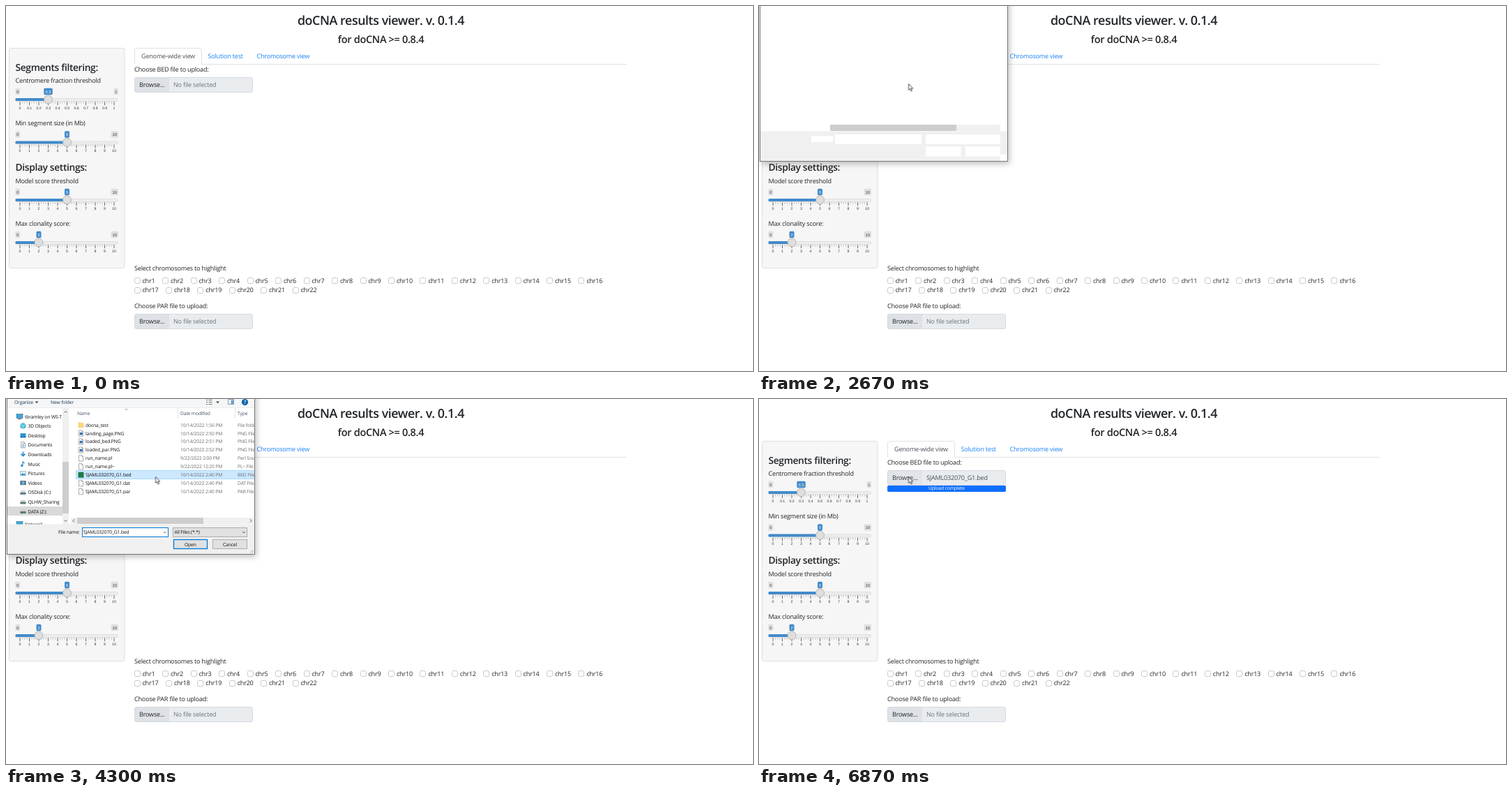
These frames come from a looping animation (1071 px wide and 523 px high, 8 s). An HTML page:

```html
<!DOCTYPE html>
<html lang="en">
<head>
<meta charset="utf-8">
<title>Results viewer</title>
<style>
html, body { margin: 0; width: 100%; height: 100%; overflow: hidden; background: #fff; }
#stage { position: absolute; left: 0; top: 0; width: 1071px; height: 523px; overflow: hidden; }
svg { position: absolute; left: 0; top: 0; }
text, .bar { font-family: "Open Sans", "Noto Sans", sans-serif; letter-spacing: -.022em; text-rendering: geometricPrecision; }
.h { font-weight: 600; letter-spacing: -.025em; }
.num { font-family: "Liberation Sans", Arial, sans-serif; letter-spacing: 0; }

/* Parts that switch on and off within the 8 s loop */
.timed { opacity: 0; animation: 8s step-end infinite; }
.hovered { animation-name: hovered; }
.before { animation-name: before; }
.after { animation-name: after; }
.ring { animation-name: ring; }
.listed { animation-name: listed; }
.early { animation-name: early; }
.blank { animation-name: blank; }
.ready { animation-name: ready; }
.rowHover { animation-name: rowHover; }
.picked { animation-name: picked; }
.caret { animation-name: caret; }
@keyframes hovered { 10% { opacity: 1 } 100% { opacity: 1 } }
@keyframes before { 0% { opacity: 1 } 62.875% { opacity: 0 } }
@keyframes after { 62.875%, 100% { opacity: 1 } }
@keyframes ring { 11.5% { opacity: 1 } 12.375% { opacity: 0 } 26.5% { opacity: 1 } 28.25% { opacity: 0 } }
@keyframes listed { 36.125%, 100% { opacity: 1 } }
@keyframes early { 36.125% { opacity: 1 } 37.875% { opacity: 0 } }
@keyframes blank { 0% { opacity: 1 } 37.875% { opacity: 0 } }
@keyframes ready { 37.875%, 100% { opacity: 1 } }
@keyframes rowHover { 36.125% { opacity: 1 } 49.375% { opacity: 0 } }
@keyframes picked { 49.375%, 100% { opacity: 1 } }
@keyframes caret { 37.875% { opacity: 1 } 44.375% { opacity: 0 } }

.dialog { opacity: 0; transform-origin: 178px 60px; animation: dialog 8s linear infinite; }
@keyframes dialog {
  0%, 28.24% { opacity: 0; transform: scale(.94) }
  28.25% { opacity: .3; transform: scale(.95); animation-timing-function: ease-out }
  31%, 55.49% { opacity: 1; transform: none }
  55.5%, 100% { opacity: 0; transform: none }
}
.frame { filter: drop-shadow(2px 3px 4px rgba(0, 0, 0, .26)); }

.cursor { animation: cursor 8s linear infinite; }
@keyframes cursor {
  0%, .86% { opacity: 0; transform: translate(874px, 430px) }
  .875% { opacity: 1; transform: translate(874px, 430px); animation-timing-function: cubic-bezier(.3, 0, .4, 1) }
  10.625%, 100% { opacity: 1; transform: translate(214.5px, 111.5px) }
}

.track { position: absolute; left: 184px; top: 124px; width: 170px; height: 8.5px; border-radius: 2px; overflow: hidden; background: #e9ecef; }
.fill { position: absolute; left: 0; top: 0; height: 100%; background: #0d6efd; overflow: hidden; animation: fill 8s linear infinite; }
.bar { width: 100%; position: absolute; left: 0; top: 0; overflow: hidden; white-space: nowrap; text-align: center; color: #fff; font-size: 6.8px; line-height: 8.5px; }
.sending { animation-name: sending; }
.done { animation-name: done; }
@keyframes fill {
  0%, 66.125% { width: 0 }
  74.875% { width: 61px }
  76.5% { width: 86px; animation-timing-function: ease }
  85.875%, 100% { width: 170px }
}
@keyframes sending { 0% { opacity: 1 } 77.375% { opacity: 0 } }
@keyframes done { 77.375%, 100% { opacity: 1 } }
</style>
</head>
<body>
<div id="stage"></div>
<script>
const FILE = 'SJAML032070_G1.bed';
const range = n => [...Array(n).keys()];
const list = (n, draw) => range(n).map(draw).join('');
const text = (x, y, s, size = 9.05, fill = '#212529', extra = '') =>
  `<text x="${x}" y="${y}" font-size="${size}" fill="${fill}" ${extra}>${s}</text>`;
const rect = (x, y, w, h, fill, extra = '') =>
  `<rect x="${x}" y="${y}" width="${w}" height="${h}" fill="${fill}" ${extra}/>`;
const path = (d, stroke, width = 1, fill = 'none') =>
  `<path d="${d}" stroke="${stroke}" stroke-width="${width}" fill="${fill}"/>`;
const timed = (name, body) => `<g class="timed ${name}">${body}</g>`;
const small = (x, y, s, fill = '#111', extra = '') => text(x, y, s, 6.75, fill, extra);
const middle = 'text-anchor="middle"';
const chevron = (x, y, r, dir = 1, color = '#444') =>
  path(`M${x - r} ${y - r * dir / 2}l${r} ${r * dir}l${r} ${-r * dir}`, color, .9);

function slider(label, cy, max, value) {
  const at = v => 20 + 135 * v / max;
  const badge = (x, w, s, bg, fg) => rect(x - w / 2, cy - 16.2, w, 9.4, bg, 'rx="1.6"') +
    text(x, cy - 9.4, s, 5.7, fg, `class="num" ${middle}`);
  const ticks = list(41, i => {
    const x = 20 + i * 3.375, big = i % 4 === 0;
    return path(`M${x} ${cy + 3.2}v${big ? 5 : 2.4}`, big ? '#444' : '#999', big ? .8 : .6);
  });
  const labels = list(11, i =>
    text(20 + i * 13.5, cy + 13.8, +(i * max / 10).toFixed(1), 5.2, '#333', `class="num" ${middle}`));
  const x = at(value), maxW = max > 9 ? 10.5 : 6.5;
  return text(13.5, cy - 24.2, label) + ticks + labels +
    rect(13.5, cy - 1.5, 147, 4, '#ededed', 'rx="2" stroke="#d2d2d2" stroke-width=".6"') +
    rect(13.5, cy - 2, x - 13.5, 4, '#428bca', 'rx="1.5"') +
    badge(16.8, 7, 0, '#dee0e3', '#333') + badge(161 - maxW / 2, maxW, max, '#dee0e3', '#333') +
    badge(x, value < 1 ? 12.5 : 7, value, '#428bca', '#fff') +
    `<circle cx="${x}" cy="${cy - .2}" r="6" fill="#dedede" stroke="#ababab" stroke-width=".8"/>`;
}

function upload(y, label, live) {
  const browse = fill => text(191, y + 13.8, 'Browse...', 9.05, fill);
  const button = fill => path(`M234 ${y}H187q-2.5 0-2.5 2.5v16q0 2.5 2.5 2.5H234z`, 'none', 0, fill);
  const empty = text(240, y + 13.8, 'No file selected', 9.05, '#6c757d');
  return text(184, y - 8.4, label) +
    rect(184.5, y, 169, 21, '#e9ecef', 'rx="2.5"') + button('#dee2e6') + browse('#212529') +
    (live ? timed('hovered', button('#e1e4e9') + browse('#3b3642')) +
      timed('before', empty) + timed('after', text(240, y + 13.8, FILE, 9.05, '#495057')) : empty) +
    rect(184.5, y, 169, 21, 'none', 'rx="2.5" stroke="#ced4da" stroke-width=".8"');
}

function checkbox(i) {
  const row = i < 16 ? 0 : 1;
  const x = row ? 184 + (i - 16) * 45.4 : 184 + i * 40.5 + Math.max(0, i - 9) * 4.9;
  const y = 389.5 + row * 13.7;
  return rect(Math.floor(x) + .5, Math.floor(y) + .5, 8, 8, '#fff', 'rx="2" stroke="#bcbcbc" stroke-width=".8"') +
    text(x + 11.5, y + 7, 'chr' + (i + 1));
}

const page = () =>
  text(537.5, 26.5, 'doCNA results viewer. v. 0.1.4', 17.9, '#212529', `class="h" ${middle}`) +
  text(537.5, 52.7, 'for doCNA &gt;= 0.8.4', 14.6, '#212529', `class="h" ${middle}`) +
  rect(4.5, 60.5, 165.5, 315, '#f6f6f6', 'rx="2.5" stroke="#dfdfdf"') +
  text(13.5, 92.5, 'Segments filtering:', 13.8, '#212529', 'class="h"') +
  slider('Centromere fraction threshold', 134, 1, .3) +
  slider('Min segment size (in Mb)', 195.5, 10, 5) +
  text(13.5, 236, 'Display settings:', 13.8, '#212529', 'class="h"') +
  slider('Model score threshold', 278, 10, 5) +
  slider('Max clonality score:', 339, 10, 2) +
  path('M184.5 83.5V63.5q0-3 3-3H277.5q3 0 3 3V83.5H890', '#dee2e6') +
  text(194, 75.4, 'Genome-wide view', 9.05, '#495057') +
  text(289.5, 75.4, 'Solution test', 9.05, '#1a82f7') +
  text(359.5, 75.4, 'Chromosome view', 9.05, '#1a82f7') +
  upload(102.5, 'Choose BED file to upload:', true) +
  text(184, 379, 'Select chromosomes to highlight') + list(22, checkbox) +
  upload(441.5, 'Choose PAR file to upload:', false);

// Icons are drawn around their own centre
const BLUE = '#2b8fd0';
const sheet = path('M-3-4.2H1.2L3-2.4V4.2H-3zM1.2-4.2V-2.4H3', '#8a8a8a', .7, '#fff');
const drive = color => rect(-4, 0, 8, 3, '#666') + rect(-3.2, -2.5, 6.4, 2, '#c8ccd0') + rect(-2, .8, 5, 1.2, color);
const icons = {
  sheet,
  image: sheet + rect(-1.8, -1.2, 4, 3.6, '#2a6fb5'),
  folder: path('M-3.5-3.5H-.5L.3-2.5H3.5V3.5H-3.5z', '#e8bd55', .5, '#ffd675'),
  green: rect(-4, -4, 8, 8, '#1d7a45'),
  pc: rect(-4.5, -3.5, 9, 6, '#3da5dd', 'stroke="#4c6c80" stroke-width=".6"') + path('M-2.5 3.7H2.5', '#555'),
  cube: path('M0-4L3.6-2V2L0 4L-3.6 2V-2z', '#1c86a8', .6, '#49c3df') + path('M-3.6-2L0 0L3.6-2M0 0V4', '#fff', .5),
  desktop: rect(-4, -3, 8, 6, BLUE) + path('M-4 2.4H4', '#14679e', 1.2),
  docs: sheet + path('M-1.6-1H1.6M-1.6.8H1.6M-1.6 2.6H1.6', BLUE, .8),
  down: path('M0-4V2M-3-.8L0 2.2L3-.8', BLUE, 1.7),
  music: path('M-.6 2.6V-3.6Q.2-1.8 2.2-1', BLUE, 1.2) + `<circle cx="-1.8" cy="2.5" r="1.7" fill="${BLUE}"/>`,
  pictures: rect(-4, -3, 8, 6, '#dff1fb', 'stroke="#7a98a8" stroke-width=".6"') + path('M-3.5 2.6L-1-.6L.8 1.2L2-.2L3.6 2.6z', 'none', 0, BLUE),
  videos: rect(-4, -3, 8, 6, '#4a5560') + rect(-2.3, -2.4, 4.6, 4.8, '#5db4e4'),
  disk: drive('#3c9fe0'),
  net: drive('#2fae55')
};
const icon = (name, x, y) => `<g transform="translate(${x} ${y})">${icons[name]}</g>`;

function sidebar() {
  const places = [
    ['tbramley on WS-T', 'pc'], ['3D Objects', 'cube'], ['Desktop', 'desktop'], ['Documents', 'docs'],
    ['Downloads', 'down'], ['Music', 'music'], ['Pictures', 'pictures'], ['Videos', 'videos'],
    ['OSDisk (C:)', 'disk'], ['QLHW_Sharing', 'net'], ['DATA (Z:)', 'net'], ['Network', 'pc']
  ];
  const quick = ['docs', 'music', 'pictures', 'videos'], drives = ['disk', 'net'];
  return rect(2, 154, 79, 13, '#d9d9d9') + places.map(([name, kind], i) => {
    const y = i < 11 ? 25 + i * 13.6 : 179, root = kind === 'pc', x = root ? 19.5 : 24.5;
    return small(root ? 27 : 31.5, y + 2.5, name) +
      (quick.includes(kind) ? icon(kind, x, y) : timed('ready', icon(kind, x, y))) +
      (drives.includes(kind) ? timed('early', icon('sheet', x, y)) : '');
  }).join('') +
    rect(81, 13, 9, 167, '#f0f0f0') + rect(81, 90, 9, 74, '#cdcdcd') +
    chevron(85.5, 18.5, 2, -1) + chevron(85.5, 174.5, 2) + rect(90, 13, 6, 155, '#fff');
}

function fileList() {
  const day = '10/14/2022 ';
  const files = [
    ['docna_test', day + '1:56 PM', 'File folder', 'folder'],
    ['landing_page.PNG', day + '2:50 PM', 'PNG File', 'image'],
    ['loaded_bed.PNG', day + '2:51 PM', 'PNG File', 'image'],
    ['loaded_par.PNG', day + '2:52 PM', 'PNG File', 'image'],
    ['run_name.pl', '9/22/2022 2:00 PM', 'Perl Source', 'sheet'],
    ['run_name.pl~', '9/22/2022 12:20 PM', 'PL~ File', 'sheet'],
    [FILE, day + '2:40 PM', 'BED File', 'green'],
    ['SJAML032070_G1.dat', day + '2:40 PM', 'DAT File', 'sheet'],
    ['SJAML032070_G1.par', day + '2:40 PM', 'PAR File', 'sheet']
  ];
  return timed('rowHover', rect(101, 103, 255, 12, '#e5f3ff')) +
    timed('picked', rect(100.5, 102.5, 256, 12, '#cce8ff', 'stroke="#99d1ff" stroke-width=".8"')) +
    small(102, 23.4, 'Name', '#44546a') + small(250, 23.4, 'Date modified', '#44546a') + small(332, 23.4, 'Type', '#44546a') +
    path('M246.5 13V28M328.5 13V28', '#e2e2e2') + chevron(172.5, 15, 2, -1, '#888') +
    files.map(([name, date, type, kind], i) => {
      const y = 37.2 + i * 11.92;
      return timed('early', icon(kind === 'folder' ? kind : 'sheet', 107.5, y)) + timed('ready', icon(kind, 107.5, y)) +
        small(114, y + 2.4, name) + small(250, y + 2.4, date, '#6d6d6d') + small(332, y + 2.4, type, '#6d6d6d');
    }).join('');
}

const toolbar = () =>
  rect(2, 0, 354, 11.5, '#f5f6f7') + path('M2 12.5H356', '#e8e9ea') +
  small(12, 7, 'Organize', '#1e395b') + small(64, 7, 'New folder', '#1e395b') +
  path('M41.5 3.5h5l-2.5 2.8zM301 3.5h5l-2.5 2.8z', 'none', 0, '#444') +
  path('M287 1.5h2M287 4.5h2M287 7.5h2M290.5 1.5h5M290.5 4.5h5M290.5 7.5h5', '#666', 1.2);

const paneButtons = () =>
  path('M318.5 .5h8v7h-8z', '#7c8ca0', .9, '#fff') + rect(322.5, 1.5, 3.5, 6, '#6a9fd4') +
  '<circle cx="342.5" cy="4.6" r="4.6" fill="#0a64ad"/>' + text(342.5, 7.3, '?', 7.5, '#fff', `class="h" ${middle}`);

const controls = () => {
  const box = (x, y, w, fill, stroke, width = 1) => rect(x, y, w, 13, fill, `stroke="${stroke}" stroke-width="${width}"`);
  return small(75, 193.3, 'File name:') +
    box(109.5, 184.5, 123, '#fff', '#0078d7') + chevron(227.5, 191, 1.8) +
    box(239.5, 184.5, 106, '#e1e1e1', '#adadad') + small(241.5, 193.3, 'All Files (*.*)') + chevron(341, 191, 1.8) +
    box(240.5, 201.5, 48, '#e1e1e1', '#0078d7', 1.3) + small(264.3, 210.5, 'Open', '#111', middle) +
    box(296.5, 201.5, 49, '#e1e1e1', '#adadad') + small(321, 210.5, 'Cancel', '#111', middle) +
    path('M350 220.5L354.5 216M352.5 220.5L354.5 218.5', '#aaa', .9) +
    timed('caret', path('M111.5 187V196', '#000')) + timed('picked', small(111, 193.3, FILE));
};

const dialog = () => `<g class="dialog">
  ${rect(1.5, -20, 355, 242.5, '#fff', 'class="frame" stroke="#777"')}
  <g clip-path="url(#inside)">
    ${timed('listed', sidebar() + fileList())}
    ${timed('ready', toolbar())}
    ${timed('listed', paneButtons())}
    ${rect(102, 170, 244, 9, '#f0f0f0')}${rect(102, 170, 181, 9, '#cdcdcd')}
    ${timed('listed', rect(93, 170, 9, 9, '#f0f0f0') + rect(346, 170, 10, 9, '#f0f0f0') +
      path('M98 172.3l-2 2.1l2 2.1M350 172.3l2 2.1l-2 2.1', '#444', .9))}
    ${rect(2, 179.5, 354, 42.5, '#f0f0f0')}
    ${timed('blank', rect(75, 186.5, 31, 8.5, '#fff') + rect(109, 184, 124, 14, '#fff') +
      rect(239, 184, 107, 14, '#fff') + rect(239, 201, 50.5, 14.5, '#fff') +
      rect(296, 201, 50, 14.5, '#fff') + rect(346, 212.5, 10, 9.5, '#fff'))}
    ${timed('ready', controls())}
  </g></g>`;

const pointer = () => timed('ring', '<circle cx="222.5" cy="112" r="3.7" fill="none" stroke="#58b6e8" stroke-width="1.6"/>') +
  `<g class="cursor">${path('M0 0V9L2 7L3.5 10.4L5 9.8L3.6 6.5H6.2z', '#1c1c2c', .8, '#fff')}</g>`;

const layer = body => `<svg width="1071" height="523" viewBox="0 0 1071 523">${body}</svg>`;
document.getElementById('stage').innerHTML =
  layer('<clipPath id="inside"><rect x="2" y="0" width="354" height="222"/></clipPath>' + page()) +
  `<div class="track timed after"><div class="fill">
    <div class="bar timed sending">${FILE}</div><div class="bar timed done">Upload complete</div>
  </div></div>` +
  layer(dialog() + pointer());
</script>
</body>
</html>
```
